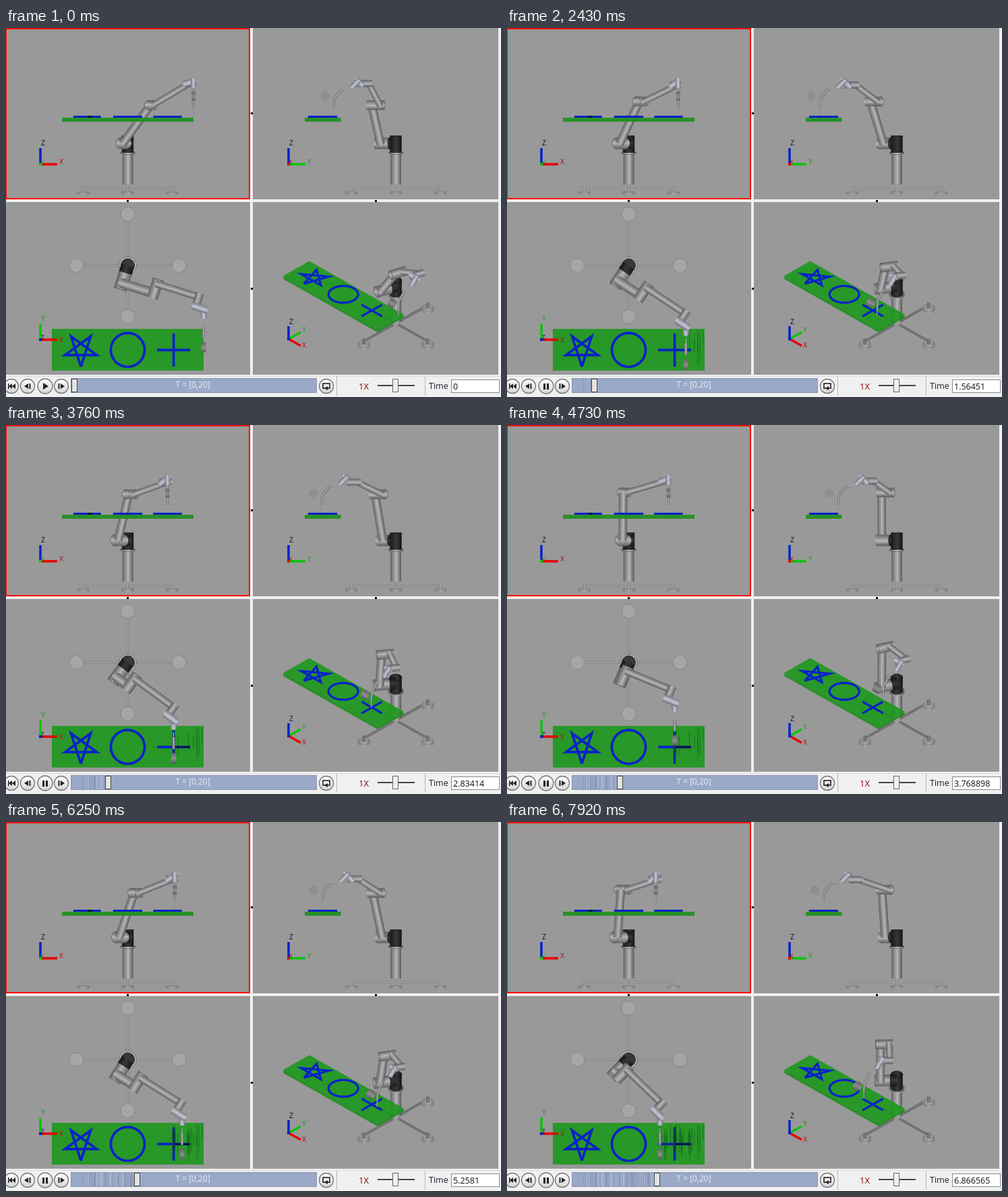
An HTML page with a canvas for the animation above (7.99 s loop, 734x547 px).

```html
<!DOCTYPE html>
<html lang="en">
<head>
<meta charset="utf-8">
<title>Robot arm drawing simulation</title>
<style>
html, body { margin: 0; width: 100%; height: 100%; overflow: hidden; background: #f0f0f0; }
canvas { display: block; }
</style>
</head>
<body>
<canvas id="stage" width="734" height="547"></canvas>
<script>
const g = document.getElementById('stage').getContext('2d');
const LOOP = 7990, START = 1670, STEP = 69.44;
const FONT = '"Open Sans", "Noto Sans", sans-serif';
const BLUE = '#0a22c8', RED = '#e80000', GREEN = '#0cc40c';
const METAL = ['#59595b', '#b6b6b9', '#636366'];
const PALE = ['#6c6e78', '#c6c9d6', '#787a84'];
const DULL = ['#7c7c7c', '#a6a6a6', '#808080'];
const STEEL = ['#454545', '#8c8c8c', '#4a4a4a'];
const DARK = ['#141414', '#383838', '#1a1a1a'];

// Orthographic views: origin and the screen images of the x, y and z axes
const VIEWS = [
  { pane: [0, 0, 362, 254], o: [180.5, 247], x: [1, 0], y: [0, 0], z: [0, -1], eye: [0, -1, 0], s: 1 },
  { pane: [366, 0, 364, 254], o: [578, 247], x: [0, 0], y: [1, 0], z: [0, -1], eye: [1, 0, 0], s: 1 },
  { pane: [0, 258, 362, 256], o: [180.5, 352], x: [1.154, 0], y: [0, -1.154], z: [0, 0], eye: [0, 0, 1], s: 1.154 },
  { pane: [366, 258, 364, 256], o: [578, 445], x: [.717, .405], y: [.717, -.405], z: [0, -.815], eye: [.577, -.577, .577], s: 1.01 }
];
let view;

const add = (a, b, k = 1) => a.map((v, i) => v + k * b[i]);
const dot = (a, b) => a[0] * b[0] + a[1] * b[1] + a[2] * b[2];
const cross = (a, b) => [a[1] * b[2] - a[2] * b[1], a[2] * b[0] - a[0] * b[2], a[0] * b[1] - a[1] * b[0]];
const unit = a => a.map(v => v / Math.hypot(...a));
const rand = n => { const v = Math.sin(n * 127.1 + 3.7) * 43758.5; return v - Math.floor(v); };
const clamp = v => Math.max(0, Math.min(1, v));
const ease = u => u * u * (3 - 2 * u);

const project = p => [0, 1].map(i => view.o[i] + p[0] * view.x[i] + p[1] * view.y[i] + p[2] * view.z[i]);

function trace(points, closed) {
  g.beginPath();
  points.forEach(p => g.lineTo(...p));
  if (closed) g.closePath();
}
function line(points, color, width) {
  trace(points);
  g.strokeStyle = color;
  g.lineWidth = width;
  g.stroke();
}
function poly(points, color) {
  trace(points, true);
  g.fillStyle = color;
  g.fill();
}
function box(x, y, w, h, color) {
  g.fillStyle = color;
  g.fillRect(x, y, w, h);
}
function frame(x, y, w, h, color) {
  g.strokeStyle = color;
  g.lineWidth = 1;
  g.strokeRect(x + .5, y + .5, w - 1, h - 1);
}
function text(str, x, y, color, size = 12.5, align = 'left') {
  g.font = size + 'px ' + FONT;
  g.textAlign = align;
  g.fillStyle = color;
  g.fillText(str, x, y);
}

// ---------- solids ----------
function cylinder(a, b, r, tones) {
  const axis = unit(add(b, a, -1));
  if (dot(axis, view.eye) < 0) return cylinder(b, a, r, tones);
  const e1 = unit(cross(axis, Math.abs(axis[2]) < .9 ? [0, 0, 1] : [1, 0, 0]));
  const e2 = cross(axis, e1);
  const disc = c => Array.from({ length: 28 }, (_, i) => {
    const q = i * Math.PI / 14;
    return project(add(add(c, e1, r * Math.cos(q)), e2, r * Math.sin(q)));
  });
  const p = project(a), q = project(b);
  const dx = q[0] - p[0], dy = q[1] - p[1], len = Math.hypot(dx, dy), w = r * view.s;
  let fill = tones[1];
  if (len > .5) {
    const nx = -dy / len * w, ny = dx / len * w;
    fill = g.createLinearGradient(p[0] + nx, p[1] + ny, p[0] - nx, p[1] - ny);
    fill.addColorStop(0, tones[0]);
    fill.addColorStop(.45, tones[1]);
    fill.addColorStop(1, tones[2]);
    poly(disc(a), fill);
    line([p, q], fill, 2 * w);
  }
  poly(disc(b), fill);
  if (r > 7) {
    trace(disc(b), true);
    g.strokeStyle = tones[0];
    g.lineWidth = .7;
    g.stroke();
  }
}

function base() {
  const tones = view === VIEWS[3] ? STEEL : DULL;
  for (const [x, y] of [[-1, 0], [0, 1], [1, 0], [0, -1]]) {
    const at = (d, z) => [x * d, y * d, z];
    cylinder(at(6, 9), at(66, 9), 1.6, tones);
    cylinder(at(66, 0), at(66, 4), 9, DULL);
    cylinder(at(66, 4), at(66, 13), 2, tones);
  }
  cylinder([0, 0, 15], [0, 0, 60], 8, METAL);
  cylinder([0, 0, 60], [0, 0, 63], 11, METAL);
}

// ---------- board with star, circle and cross ----------
function board() {
  const [x0, x1, y0, y1, z0, z1] = [-97.5, 97.5, -135, -81.5, 108, 114];
  const face = (color, ...pts) => poly(pts.map(project), color);
  g.globalAlpha = .9;
  face('#1c981c', [x0, y0, z1], [x1, y0, z1], [x1, y1, z1], [x0, y1, z1]);
  face('#1d8f1d', [x0, y0, z0], [x1, y0, z0], [x1, y0, z1], [x0, y0, z1]);
  face('#1d8f1d', [x1, y0, z0], [x1, y1, z0], [x1, y1, z1], [x1, y0, z1]);
  g.globalAlpha = 1;
  const draw = pts => line(pts.map(p => project([p[0], p[1], 115.5])), BLUE, 3.2 * view.s);
  const ring = (n, turn, cx, cy, r) => Array.from({ length: n + 1 }, (_, i) => {
    const q = -Math.PI / 2 + i * turn;
    return [cx + r * Math.cos(q), cy + r * Math.sin(q)];
  });
  draw(ring(5, Math.PI * .8, -60.2, -108.5, 21.5));
  draw(ring(48, Math.PI / 24, 0, -108.5, 21.7));
  draw([[59, -130], [59, -87.3]]);
  draw([[37.8, -108.6], [80.2, -108.6]]);
  if (view === VIEWS[0]) box(121, 130, 6, 3, '#06102c');
}

// Dark marks left where the tool has passed
function streaks(step) {
  g.globalAlpha = .5;
  for (let j = 0; j < step; j++) {
    if (rand(j) > .45) continue;
    const x = 180.5 + tipAt(simTime(j))[0] * 1.154 + rand(j + 50) * 5 - 2;
    const y = 448 + rand(j + 99) * 18;
    line([[x, y], [x, y + 14 + rand(j + 7) * 26]], '#0b4a1c', 1);
  }
  g.globalAlpha = 1;
  if (step >= 19) line([[250, 477.5], [273, 477.5]], '#0a1450', 3);
}

// ---------- motion ----------
const CLOCK = [[0, .8286], [4, 1.09623], [19, 2.099688], [44, 3.768898], [66, 5.2581], [79, 6.119806], [90, 6.866565]];
function simTime(step) {
  let i = 0;
  while (i < CLOCK.length - 2 && step > CLOCK[i + 1][0]) i++;
  const [[a, va], [b, vb]] = [CLOCK[i], CLOCK[i + 1]];
  return va + (vb - va) * (step - a) / (b - a);
}

const LEGS = [ // start, end, target x, target y
  [.88, 2.05, 59, -127], [2.05, 3.78, 59, -87],
  [3.85, 4.3, 80, -108.5], [4.3, 7.3, 37.8, -108.5]
];
function tipAt(t) {
  let p = [97.5, -92];
  for (const [a, b, x, y] of LEGS) {
    const u = ease(clamp((t - a) / (b - a)));
    p = [p[0] + (x - p[0]) * u, p[1] + (y - p[1]) * u];
  }
  return [...p, 117];
}

// Six-axis arm: solve the joints for a tip with fixed tool direction
function armParts(tip) {
  const UPPER = 71, FORE = 65, SIDE = 24, BACK = 12.5, WRIST = 13, LATERAL = SIDE - BACK + WRIST;
  const tool = [0, -.707, -.707], flange = add(tip, [0, 36, 51]);
  let pan = -.5, n, w, v, reach;
  for (let i = 0; i < 10; i++) {
    n = [Math.sin(pan), -Math.cos(pan), 0];
    w = unit(cross(n, tool));
    v = add(flange, w, -11);
    reach = Math.hypot(v[0], v[1]);
    pan = Math.atan2(v[1], v[0]) + Math.asin(LATERAL / reach);
  }
  const r = Math.sqrt(reach * reach - LATERAL * LATERAL), h = v[2] - 76, d = Math.hypot(r, h);
  const lift = Math.atan2(h, r) + Math.acos(Math.min(1, (UPPER * UPPER + d * d - FORE * FORE) / (2 * UPPER * d)));
  const hub = [0, 0, 76], shoulder = add(hub, n, SIDE);
  const elbow = add(shoulder, [Math.cos(pan) * Math.cos(lift), Math.sin(pan) * Math.cos(lift), Math.sin(lift)], UPPER);
  const inner = add(elbow, n, -BACK), wrist = add(v, n, -WRIST);
  const neck = add(tip, [0, 11, 38]), bend = add(tip, [0, 1, 26]), cup = add(tip, [0, -13, 29]);
  return [
    [[0, 0, 62], [0, 0, 87], 8.7, DARK],
    [hub, add(hub, n, 10), 8.5, DARK],
    [add(hub, n, 10), add(hub, n, 32), 8.5, METAL],
    [shoulder, elbow, 6.3, METAL],
    [add(elbow, n, 7), add(inner, n, -6), 7.1, METAL],
    [inner, wrist, 4.7, METAL],
    [add(wrist, n, -5), add(v, n, 4), 5.2, METAL],
    [add(v, w, -4), add(flange, w, 4), 4.8, PALE],
    [add(flange, tool, -3), add(flange, tool, 14), 4, PALE],
    [add(neck, [0, 4, 0]), add(neck, [0, 9, 0]), .7, PALE],
    [add(neck, [0, 2, 2]), bend, 1.8, METAL],
    [bend, add(tip, [0, 0, 12]), 1.6, METAL],
    [add(tip, [0, 0, 12]), tip, .8, DULL],
    [add(cup, [-3, 0, 0]), add(cup, [3, 0, 0]), 6.5, ['#5c5c5c', '#8e8e8e', '#646464']]
  ];
}

// ---------- axis markers ----------
function axes() {
  const mark = (ox, oy, arms) => arms.forEach(([dx, dy, color, name, lx, ly, ink]) => {
    line([[ox, oy], [ox + dx, oy + dy]], color, 3.6);
    text(name, lx, ly, ink, 10.5, 'center');
  });
  const X = '#b01010', Y = '#1c9c1c', Z = '#101040';
  const i = VIEWS.indexOf(view);
  if (i === 0) {
    mark(51, 202, [[0, -24, BLUE, 'Z', 55, 174, Z], [25, 0, RED, 'X', 82, 202, X]]);
    text('Y', 54, 203, Y, 9, 'center');
  } else if (i === 1) {
    mark(419, 202, [[0, -24, BLUE, 'Z', 423, 174, Z], [25, 0, GREEN, 'Y', 450, 202, Y]]);
    text('X', 422, 202, X, 9, 'center');
  } else if (i === 2) {
    mark(51, 462, [[0, -24, GREEN, 'Y', 55, 434, Y], [25, 0, RED, 'X', 82, 466, X]]);
    text('Z', 54, 462, Z, 9, 'center');
  } else {
    mark(419, 461, [[18, -10, GREEN, 'Y', 442, 451, Y], [18, 10, RED, 'X', 442, 474, X], [0, -19, BLUE, 'Z', 423, 439, Z]]);
  }
  box(i % 2 ? 417 : 49, i === 3 ? 459 : i === 2 ? 460 : 200, 4, 4, i === 0 ? GREEN : i === 1 ? RED : BLUE);
}

function scene(step, parts) {
  const [x, y, w, h] = view.pane;
  g.save();
  g.beginPath();
  g.rect(x, y, w, h);
  g.clip();
  box(x, y, w, h, '#999');
  base();
  if (view !== VIEWS[0]) board();
  if (view === VIEWS[2]) streaks(step);
  const depth = p => dot(add(p[0], p[1]), view.eye);
  [...parts].sort((a, b) => depth(a) - depth(b)).forEach(p => cylinder(...p));
  if (view === VIEWS[0]) board();
  axes();
  g.restore();
}

// ---------- toolbar ----------
function button(x, r, tint) {
  const y = 531, fill = g.createLinearGradient(0, y - r, 0, y + r);
  fill.addColorStop(0, '#fff');
  fill.addColorStop(1, '#d4d4d4');
  g.beginPath();
  g.arc(x, y, r, 0, 7);
  g.fillStyle = fill;
  g.fill();
  if (tint) {
    g.fillStyle = `rgba(120,180,235,${tint})`;
    g.fill();
  }
  g.strokeStyle = '#777';
  g.lineWidth = 1.3;
  g.stroke();
}
const wedge = (x, dir, h = 4, len = 6) => poly([[x, 531 - h], [x, 531 + h], [x + dir * len, 531]], '#222');

function toolbar(ms, step, t) {
  button(8, 10.5);
  box(3, 527, 1.5, 8, '#222');
  wedge(9, -1, 4, 5);
  wedge(14, -1, 4, 5);
  button(32, 10.5);
  wedge(33, -1);
  box(34.5, 527, 2, 8, '#222');
  button(58, 11, ms > 460 && ms < 940 ? .35 * Math.sin((ms - 460) / 480 * Math.PI) : 0);
  if (ms < 940) wedge(55, 1, 5, 8);
  else {
    box(54, 527, 3, 9, '#222');
    box(59, 527, 3, 9, '#222');
  }
  button(82, 10.5);
  wedge(81, 1);
  box(77.5, 527, 2, 8, '#222');

  box(96, 519, 365, 22, '#9aa9c8');
  frame(96, 519, 365, 22, '#8a95ad');
  const knob = v => 101.5 + 17.6 * v;
  g.globalAlpha = .45;
  for (let j = 0; j < step; j++) {
    if (rand(j + 20) < .6) box(Math.round(knob(simTime(j)) - 4), 520, 1, 20, rand(j + 31) < .5 ? '#c4cde0' : '#76829c');
  }
  g.globalAlpha = 1;
  text('T = [0,20]', 277, 533, '#edf0f7', 12, 'center');
  const kx = Math.round(knob(t) - 4.5);
  box(kx, 520, 9, 20, '#e4e4e4');
  frame(kx, 520, 9, 20, '#444');

  button(475, 10.5);
  g.strokeStyle = '#222';
  g.lineWidth = 1.6;
  g.strokeRect(470, 527, 10, 7);
  poly([[472, 534], [477, 531], [477, 537]], '#222');
  for (const x of [490, 621]) box(x, 517, 1, 28, '#b8b8b8');
  text('1X', 523, 536, '#8b0000', 13);
  box(551, 529, 55, 2, '#444');
  box(573, 520, 9, 20, '#f0f0f0');
  frame(573, 520, 9, 20, '#666');
  text('Time', 627, 535, '#1a1a2a');
  box(660, 521, 72, 20, '#fff');
  frame(660, 521, 72, 20, '#8a8a8a');
  text(String(+t.toFixed(6)), 663, 536, '#111');
}

function render(ms) {
  const step = ms < START ? -1 : Math.min(90, Math.floor((ms - START + 10) / STEP));
  const t = step >= 0 ? simTime(step) : ms < 1270 ? 0 : .4;
  const parts = armParts(tipAt(t));
  box(0, 0, 734, 547, '#f0f0f0');
  for (view of VIEWS) scene(step, parts);
  g.strokeStyle = '#f00';
  g.lineWidth = 2;
  g.strokeRect(0, 1, 361, 252);
  for (const [x, y] of [[363, 125], [179, 255], [547, 255], [363, 385]]) box(x, y, 3, 3, '#000');
  box(0, 516, 734, 1, '#dcdcdc');
  toolbar(ms, step, t);
}

const t0 = performance.now();
function tick() {
  render((performance.now() - t0) % LOOP);
  requestAnimationFrame(tick);
}
tick();
</script>
</body>
</html>
```
